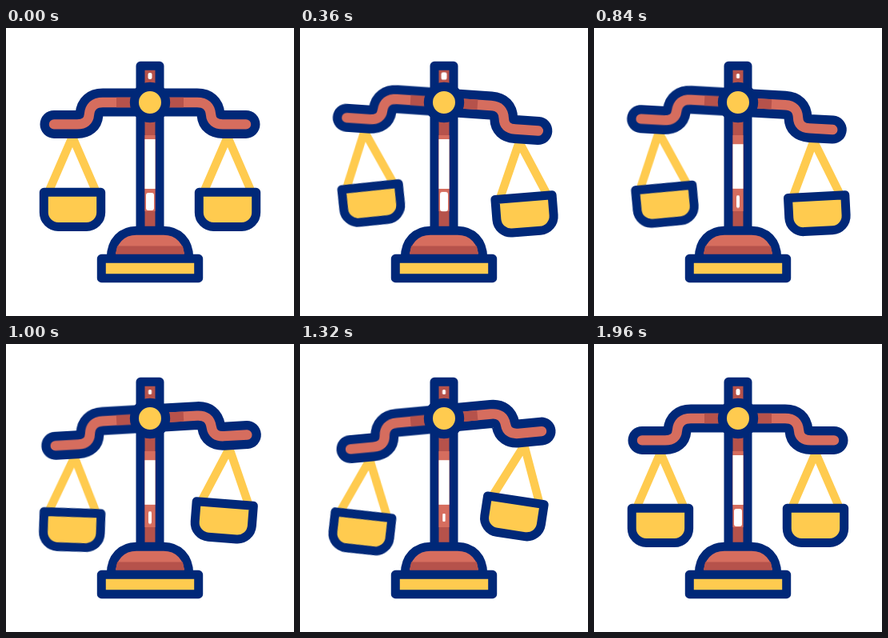
An HTML page that plays this animation: 360x360 px, repeating every 2 s.

```html
<!DOCTYPE html>
<html lang="en">
<head>
<meta charset="utf-8">
<title>Balance scales</title>
<style>
  @property --tilt  { syntax: "<angle>"; inherits: true; initial-value: 0deg; }
  @property --left  { syntax: "<angle>"; inherits: true; initial-value: 0deg; }
  @property --right { syntax: "<angle>"; inherits: true; initial-value: 0deg; }

  html, body { margin: 0; width: 100%; height: 100%; overflow: hidden; background: #fff; }

  svg {
    --navy: #002878;
    --red: #d66d5e;
    --shade: #b6524b;
    --gold: #ffcb4f;
    display: block;
    width: 100%;
    height: 100%;
    stroke-linejoin: round;
    stroke-linecap: round;
    animation: tilt 2s infinite, swing 2s infinite;
  }

  .beam  { transform: rotate(var(--tilt)); transform-origin: 180px 93px; }
  .left  { transform: rotate(calc(var(--left) - var(--tilt))); transform-origin: 83px 135px; }
  .right { transform: rotate(calc(var(--right) - var(--tilt))); transform-origin: 277px 135px; }

  .edge { stroke: var(--navy); stroke-width: 11; }
  .gold { fill: var(--gold); }
  .red { fill: var(--red); }
  .shade { fill: var(--shade); }
  .hub { fill: var(--gold); stroke: var(--navy); stroke-width: 11.2; }
  .string { fill: none; stroke: var(--gold); stroke-width: 10.4; }
  .arm { fill: none; stroke: var(--navy); stroke-width: 35; }
  .core { fill: none; stroke: var(--red); stroke-width: 12.4; }
  .band { fill: none; stroke: var(--shade); stroke-width: 12.4; stroke-linecap: butt; }

  .gap { fill: #fff; }
  .cap  { transform-origin: 180px 60px; animation: cap 2s step-end infinite; }
  .slot { transform-origin: 180px 201px; animation: slot 2s step-end infinite; }
  .chip { transform-origin: 180px 217px; animation: chip 2s step-end infinite; }

  @keyframes tilt {
    0%, 4% { --tilt: 0deg; animation-timing-function: cubic-bezier(.35, 0, .55, 1); }
    32%    { --tilt: 6.9deg; animation-timing-function: cubic-bezier(.42, 0, .58, 1); }
    60%    { --tilt: -6.9deg; animation-timing-function: cubic-bezier(.25, .25, .35, 1); }
    100%   { --tilt: 0deg; }
  }
  @keyframes swing {
    0%, 4% { --left: 0deg; --right: 0deg; animation-timing-function: cubic-bezier(.3, 0, .5, 1); }
    32%    { --left: -9.5deg; --right: -7.3deg; animation-timing-function: cubic-bezier(.4, 0, .7, 1); }
    60%    { --left: 7.7deg; --right: 10.4deg; animation-timing-function: cubic-bezier(.27, .18, .47, 1); }
    100%   { --left: 0deg; --right: 0deg; }
  }

  /* The white gaps in the post change size in jumps. */
  @keyframes cap {
    0%, 94% { transform: scale(1); }
    12% { transform: scale(1.4, 1.15); }
    26% { transform: scale(1.9, 1.5); }
    42% { transform: scale(.8, .75); }
    74% { transform: scale(.6, .7); }
  }
  @keyframes slot {
    0%, 90% { transform: scaleY(1); }
    42% { transform: scaleY(.9); }
  }
  @keyframes chip {
    0%, 90% { transform: scale(1); }
    12% { transform: scale(1, 1.1); }
    26% { transform: scale(.65, .9); }
    42% { transform: scale(.4, .7); }
    58% { transform: scale(.35, .45); }
  }
</style>
</head>
<body>
<svg viewBox="0 0 360 360">
  <defs>
    <g id="pan">
      <path class="string" d="M54 203L83 136L112 203"/>
      <path class="gold edge" d="M47.3 205.3h71.4v25.2a18 18 0 0 1-18 18h-35.4a18 18 0 0 1-18-18z"/>
    </g>
    <path id="curve" d="M60 120.4H89Q103 120.4 104 108Q105.5 93 121 93H180"/>
    <g id="half">
      <use href="#curve" class="arm"/>
      <use href="#curve" class="core"/>
      <path class="band" d="M138 93H180"/>
    </g>
  </defs>

  <rect class="shade edge" x="168" y="47.3" width="24" height="212"/>
  <path class="red" d="M173.5 134h13v95h-13z"/>
  <rect class="gap cap" x="177.5" y="56" width="5" height="8" rx="2"/>
  <rect class="gap slot" x="173.5" y="139" width="13" height="62"/>
  <rect class="gap chip" x="175" y="206" width="10" height="22" rx="3"/>

  <path class="red edge" d="M131.2 288C131.2 266 145 253.2 163 253.2H197C215 253.2 228.8 266 228.8 288z"/>
  <path class="shade" d="M139 272.5H221L223 284H137z"/>
  <rect class="gold edge" x="119.3" y="288.3" width="121.4" height="24.4"/>

  <g class="beam">
    <g class="left"><use href="#pan"/></g>
    <g class="right"><use href="#pan" x="194"/></g>
    <use href="#half"/>
    <use href="#half" transform="matrix(-1 0 0 1 360 0)"/>
  </g>
  <circle class="hub" cx="180" cy="93" r="19.6"/>
</svg>
</body>
</html>
```
